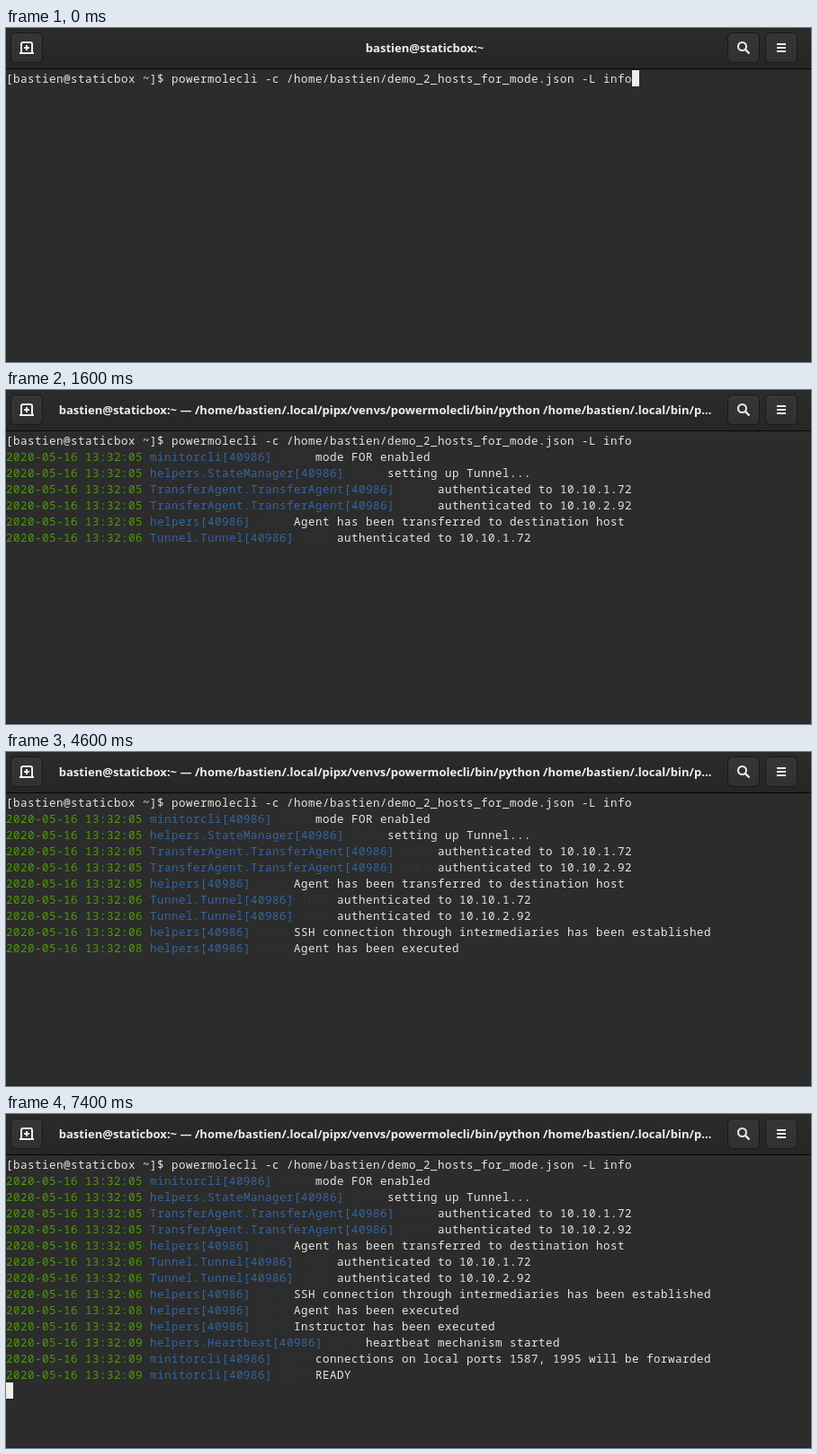
These frames come from a looping animation (895 by 372 pixels, 8000 ms). An HTML page:

```html
<!DOCTYPE html>
<html lang="en">
<head>
<meta charset="utf-8">
<title>Terminal</title>
<style>
html, body { margin: 0; width: 100%; height: 100%; overflow: hidden; background: #2c2c2c; }
#stage { position: relative; width: 895px; height: 372px; overflow: hidden; background: #2c2c2c; }
#stage::after { content: ""; position: absolute; left: 0; bottom: 0; width: 100%; height: 1px; background: #232323; }

/* header bar */
header { position: absolute; inset: 0 0 auto; height: 45px; background: linear-gradient(#2b2b2b, #262626); border-bottom: 1px solid #070707; }
header svg { position: absolute; left: 0; top: 0; }
.title { position: absolute; top: 12px; margin: 0; transform: translateX(-50%); white-space: pre; color: #eeeeec;
  font: 700 13.05px/20px "Noto Sans", "Open Sans", sans-serif; }
.idle { left: 465.5px; animation: leave 8s step-end infinite; }
.busy { left: 421.5px; animation: enter 8s step-end infinite; }

/* terminal text on a grid of 8 x 18 px cells */
#log { position: absolute; left: 0; top: 47px; width: 895px; overflow: hidden; color: #e6e6e3;
  font: 12.5px/18px "Noto Sans Mono", monospace; letter-spacing: .5px; animation: reveal 8s step-end infinite; }
#log p { position: relative; top: 1px; margin: 0; height: 18px; white-space: pre; }
#log b { font-weight: 400; color: #4e9a06; }
#log i { font-style: normal; color: #3465a4; }
#log s { text-decoration: none; color: #2e3436; }
#cursor { position: absolute; left: 0; top: 47px; width: 8px; height: 18px; background: #eeeeec; animation: cursor 8s step-end infinite; }

@keyframes leave { 0% { visibility: visible } 17.5%, 100% { visibility: hidden } }
@keyframes enter { 0% { visibility: hidden } 17.5%, 100% { visibility: visible } }
@keyframes reveal {
  0% { height: 18px }
  17.5% { height: 72px }
  20% { height: 126px }
  27.5% { height: 144px }
  30% { height: 162px }
  57.5% { height: 180px }
  60%, 100% { height: 252px }
}
@keyframes cursor {
  0% { visibility: visible; transform: translate(696px, 0) }
  5% { visibility: hidden; transform: translate(696px, 0) }
  15% { visibility: visible; transform: translate(0, 18px) }
  17.5% { visibility: visible; transform: translate(0, 72px) }
  20% { visibility: hidden; transform: translate(0, 72px) }
  30%, 42.5% { visibility: visible; transform: translate(0, 162px) }
  35%, 55% { visibility: hidden; transform: translate(0, 162px) }
  60%, 72.5%, 92.5%, 100% { visibility: visible; transform: translate(0, 252px) }
  67.5%, 80% { visibility: hidden; transform: translate(0, 252px) }
}
</style>
</head>
<body>
<div id="stage">
  <header>
    <svg width="895" height="45" fill="none" stroke="#eeeeec" stroke-width="2">
      <defs>
        <linearGradient id="face" x2="0" y2="1"><stop stop-color="#363636"/><stop offset="1" stop-color="#303030"/></linearGradient>
        <rect id="button" y="5.5" width="35" height="33" rx="5" fill="url(#face)" stroke="#181818" stroke-width="1"/>
      </defs>
      <use href="#button" x="5.5"/>
      <use href="#button" x="802.5"/>
      <use href="#button" x="844.5"/>
      <path d="M15 28h16M17 28V18q0-2 2-2h8q2 0 2 2V28M20 22h6M23 19v6"/>
      <circle cx="818.5" cy="20.5" r="4.5"/>
      <path d="M821.5 23.5l5 5" stroke-width="2.4"/>
      <path d="M857 18h10M857 22h10M857 26h10"/>
    </svg>
    <p class="title idle">bastien@staticbox:~</p>
    <p class="title busy">bastien@staticbox:~ — /home/bastien/.local/pipx/venvs/powermolecli/bin/python /home/bastien/.local/bin/p…</p>
  </header>
  <div id="log">
    <p>[bastien@staticbox ~]$ powermolecli -c /home/bastien/demo_2_hosts_for_mode.json -L info</p>
    <p><b>2020-05-16 13:32:05</b> <i>minitorcli[40986]</i> <s>INFO</s> mode FOR enabled</p>
    <p><b>2020-05-16 13:32:05</b> <i>helpers.StateManager[40986]</i> <s>INFO</s> setting up Tunnel...</p>
    <p><b>2020-05-16 13:32:05</b> <i>TransferAgent.TransferAgent[40986]</i> <s>INFO</s> authenticated to 10.10.1.72</p>
    <p><b>2020-05-16 13:32:05</b> <i>TransferAgent.TransferAgent[40986]</i> <s>INFO</s> authenticated to 10.10.2.92</p>
    <p><b>2020-05-16 13:32:05</b> <i>helpers[40986]</i> <s>INFO</s> Agent has been transferred to destination host</p>
    <p><b>2020-05-16 13:32:06</b> <i>Tunnel.Tunnel[40986]</i> <s>INFO</s> authenticated to 10.10.1.72</p>
    <p><b>2020-05-16 13:32:06</b> <i>Tunnel.Tunnel[40986]</i> <s>INFO</s> authenticated to 10.10.2.92</p>
    <p><b>2020-05-16 13:32:06</b> <i>helpers[40986]</i> <s>INFO</s> SSH connection through intermediaries has been established</p>
    <p><b>2020-05-16 13:32:08</b> <i>helpers[40986]</i> <s>INFO</s> Agent has been executed</p>
    <p><b>2020-05-16 13:32:09</b> <i>helpers[40986]</i> <s>INFO</s> Instructor has been executed</p>
    <p><b>2020-05-16 13:32:09</b> <i>helpers.Heartbeat[40986]</i> <s>INFO</s> heartbeat mechanism started</p>
    <p><b>2020-05-16 13:32:09</b> <i>minitorcli[40986]</i> <s>INFO</s> connections on local ports 1587, 1995 will be forwarded</p>
    <p><b>2020-05-16 13:32:09</b> <i>minitorcli[40986]</i> <s>INFO</s> READY</p>
  </div>
  <div id="cursor"></div>
</div>
</body>
</html>
```
